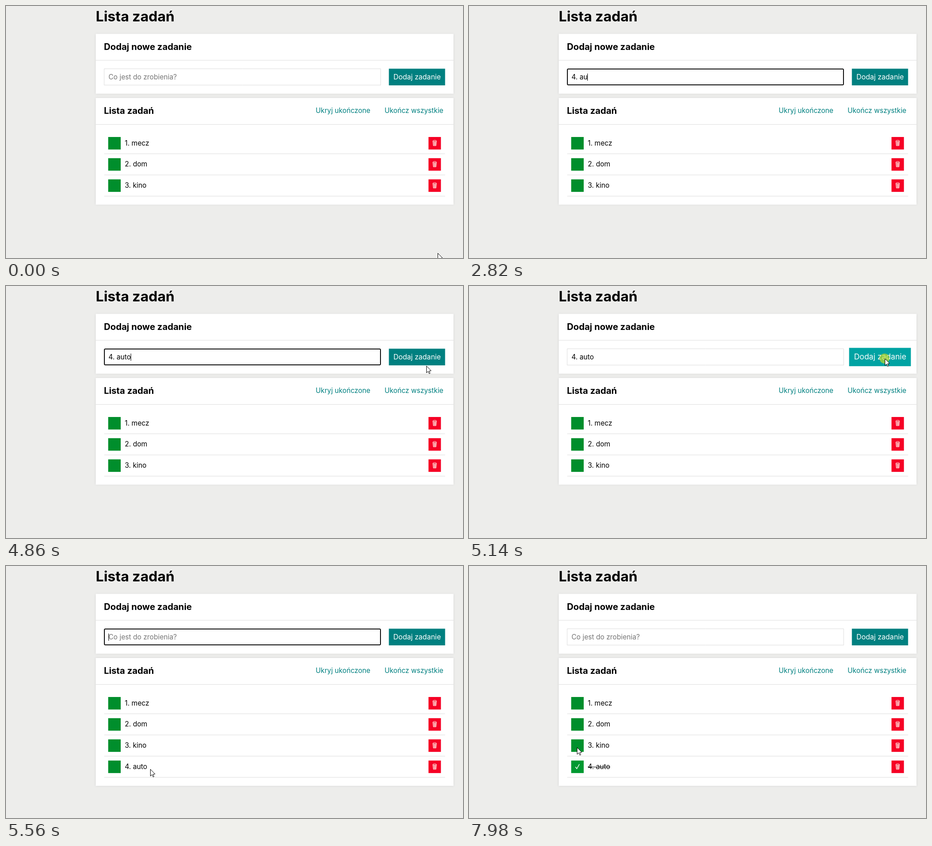
Animation of 1008 by 556 pixels, one loop 8000 ms. Source, as an HTML page with a canvas:

```html
<!DOCTYPE html>
<html lang="pl">
<head>
<meta charset="utf-8">
<title>Lista zadań</title>
<style>
html, body { margin: 0; width: 100%; height: 100%; overflow: hidden; background: #ededeb; }
canvas { display: block; }
</style>
</head>
<body>
<canvas id="stage" width="1008" height="556"></canvas>
<script>
const ctx = document.getElementById('stage').getContext('2d');
const LOOP = 8000, STEP = 66, FADE = 300, BLINK = 535;
const TEAL = [0, 128, 128], TEAL_HOVER = [0, 163, 163];
const GREEN = [0, 142, 44], GREEN_HOVER = [0, 162, 53];
const FONT = 'Inter, "Open Sans", sans-serif';
const ROW = 46.75;

// Moments of the story, in ms.
const FOCUS = 680, ADD_CLICK = 5140, ADDED = 5190, DONE_CLICK = 7650, DONE = 7720;
const TYPED = '4. auto';
const KEYS = [1560, 1890, 2150, 2350, 2820, 3020, 3450];

// Key points of the pointer's path.
const PATH = [
  { t: 10, x: 952, y: 545 }, { t: 540, x: 339, y: 158 },
  { t: 4040, x: 339, y: 158 }, { t: 4370, x: 724, y: 169 },
  { t: 4640, x: 956, y: 187 }, { t: 4790, x: 932, y: 184 },
  { t: 5000, x: 917, y: 160 }, { t: 5210, x: 917, y: 160 },
  { t: 5560, x: 318, y: 448 }, { t: 5700, x: 222, y: 452 },
  { t: 5900, x: 238, y: 434 }, { t: 7320, x: 238, y: 434 },
  { t: 7370, x: 238, y: 446 }, { t: 7720, x: 238, y: 446 },
  { t: 7980, x: 238, y: 400 }
];

const within = (v, a, b) => v >= a && v < b;
const clamp = v => Math.max(0, Math.min(1, v));
const lerp = (a, b, k) => a + (b - a) * k;
const smooth = u => { u = clamp(u); return u * u * (3 - 2 * u); };

// Hover amount: fades in from a, fades out from b.
const hover = (t, a, b) => smooth((t - a) / FADE) * (1 - smooth((t - b) / FADE));
const mix = (a, b, k) => `rgb(${a.map((v, i) => Math.round(lerp(v, b[i], k))).join(',')})`;

// The pointer is redrawn in steps, as in a screen recording.
function pointerAt(t) {
  const next = PATH.findIndex(p => p.t > t);
  if (next < 1) return next === 0 ? PATH[0] : PATH[PATH.length - 1];
  const a = PATH[next - 1], b = PATH[next];
  const k = Math.floor((t - a.t) / STEP) * STEP / (b.t - a.t);
  return { x: Math.round(lerp(a.x, b.x, k)), y: Math.round(lerp(a.y, b.y, k)) };
}

function rect(x, y, w, h, color) {
  ctx.fillStyle = color;
  ctx.fillRect(x, y, w, h);
}

function text(str, x, y, color = '#000', size = 15.2, weight = 400) {
  ctx.font = `${weight} ${size}px ${FONT}`;
  ctx.fillStyle = color;
  ctx.fillText(str, x, y);
  return ctx.measureText(str).width;
}

function line(points, color, width) {
  ctx.beginPath();
  points.forEach(([x, y]) => ctx.lineTo(x, y));
  ctx.strokeStyle = color;
  ctx.lineWidth = width;
  ctx.stroke();
}

function panel(y, h, title) {
  ctx.save();
  ctx.shadowColor = '#d5d5d5';
  ctx.shadowBlur = 5;
  rect(198, y, 789, h, '#fff');
  ctx.restore();
  rect(198, y + 57.8, 789, 1, '#ddd');
  text(title, 216, y + 35, '#000', 19.8, 700);
}

function input(t) {
  const focus = within(t, FOCUS, ADD_CLICK) || within(t, ADDED, DONE_CLICK);
  ctx.beginPath();
  if (focus) {
    ctx.roundRect(217, 139, 609, 35, 2);
    ctx.strokeStyle = '#101010';
    ctx.lineWidth = 2;
  } else {
    ctx.rect(216.5, 138.5, 610, 36);
    ctx.strokeStyle = '#ddd';
    ctx.lineWidth = 1;
  }
  ctx.stroke();
  const value = t < ADDED ? TYPED.slice(0, KEYS.filter(k => k <= t).length) : '';
  let caretX = 226;
  if (value) caretX += text(value, 226, 162);
  else text('Co jest do zrobienia?', 226, 162, '#757575');

  // Focus and every key press restart the caret's blinking.
  const restart = [FOCUS, ...KEYS, ADDED].filter(k => k <= t).pop();
  const lit = Math.floor((t - restart) / BLINK) % 2 === 0;
  if (focus && lit) rect(Math.round(caretX), 149, 1, 16, '#000');
}

function addButton(t) {
  const k = hover(t, 4860, 5274);
  ctx.save();
  ctx.translate(906.5, 156.7);
  ctx.scale(1 + 0.1 * k, 1 + 0.1 * k);
  rect(-62, -18.4, 124, 36.8, mix(TEAL, TEAL_HOVER, k));
  ctx.textAlign = 'center';
  text('Dodaj zadanie', 0.3, 5.1, '#fff', 15.6);
  ctx.restore();
}

function trash(x, y) {
  const ink = '#ffe9df';
  line([[x - 4, y - 4.5], [x - 3, y + 6], [x + 3, y + 6], [x + 4, y - 4.5]], ink, 1);
  ctx.fillStyle = 'rgba(255,233,223,0.35)';
  ctx.fill();
  ctx.beginPath();
  ctx.ellipse(x, y - 4.5, 4, 1.5, 0, 0, Math.PI * 2);
  ctx.stroke();
  for (const d of [-1.5, 0.3, 2]) line([[x + d, y - 2], [x + d * 0.8, y + 5]], ink, 0.9);
}

function task(label, i, glow, done) {
  const y = 289 + ROW * i;
  rect(225.4, y, 27.6, 27.6, mix(GREEN, GREEN_HOVER, glow));
  const w = text(label, 262, Math.round(y + 18.7));
  if (done) {
    rect(262, Math.round(y + 13.5), w, 1, '#000');
    line([[234.8, y + 14], [237.8, y + 18], [243.5, y + 8]], '#fff', 1.5);
  }
  rect(931.9, y, 27.4, 27.6, '#f60025');
  trash(945.5, y + 13.2);
  rect(216.5, y + 36.5, 752, 1, '#ddd');
}

function beam(x, y) {
  rect(x - 1, y - 6, 1, 13, '#000');
  for (const cy of [y - 7, y + 7]) {
    rect(x - 4, cy, 3, 1, '#000');
    rect(x, cy, 3, 1, '#000');
  }
}

function arrow(x, y) {
  const shape = [[0, 0], [0, 15], [3.5, 11.8], [6, 17], [8, 16], [5.8, 11], [10.3, 10.5]];
  ctx.beginPath();
  shape.forEach(([dx, dy]) => ctx.lineTo(x + dx + 0.5, y + dy + 0.5));
  ctx.closePath();
  ctx.fillStyle = '#fff';
  ctx.fill();
  ctx.strokeStyle = '#000';
  ctx.lineWidth = 1;
  ctx.stroke();
}

function pointer(t) {
  const { x, y } = pointerAt(t);
  if ([FOCUS, ADD_CLICK, DONE_CLICK].some(c => within(t, c, c + 70))) {
    ctx.beginPath();
    ctx.arc(x - 0.5, y, 11, 0, Math.PI * 2);
    ctx.fillStyle = 'rgba(205,220,30,0.65)';
    ctx.fill();
  }
  if (within(t, KEYS[0], 4040)) return; // hidden while typing
  const overInput = within(x, 216, 827) && within(y, 138, 175);
  (overInput ? beam : arrow)(x, y);
}

function draw(t) {
  rect(0, 0, 1008, 556, '#ededeb');
  text('Lista zadań', 198, 34, '#000', 31.2, 700);
  panel(61.5, 132, 'Dodaj nowe zadanie');
  input(t);
  addButton(t);

  const tasks = ['1. mecz', '2. dom', '3. kino'];
  if (t >= ADDED) tasks.push(TYPED);
  panel(203, 95 + ROW * tasks.length, 'Lista zadań');
  text('Ukryj ukończone', 683, 236, '#008080');
  text('Ukończ wszystkie', 835, 236, '#008080');
  const glow = [0, 0, hover(t, 7912, LOOP), hover(t, 5766, 7846)];
  tasks.forEach((label, i) => task(label, i, glow[i], i === 3 && t >= DONE));
  pointer(t);
}

function frame() {
  draw(performance.now() % LOOP);
  requestAnimationFrame(frame);
}
frame();
</script>
</body>
</html>
```
